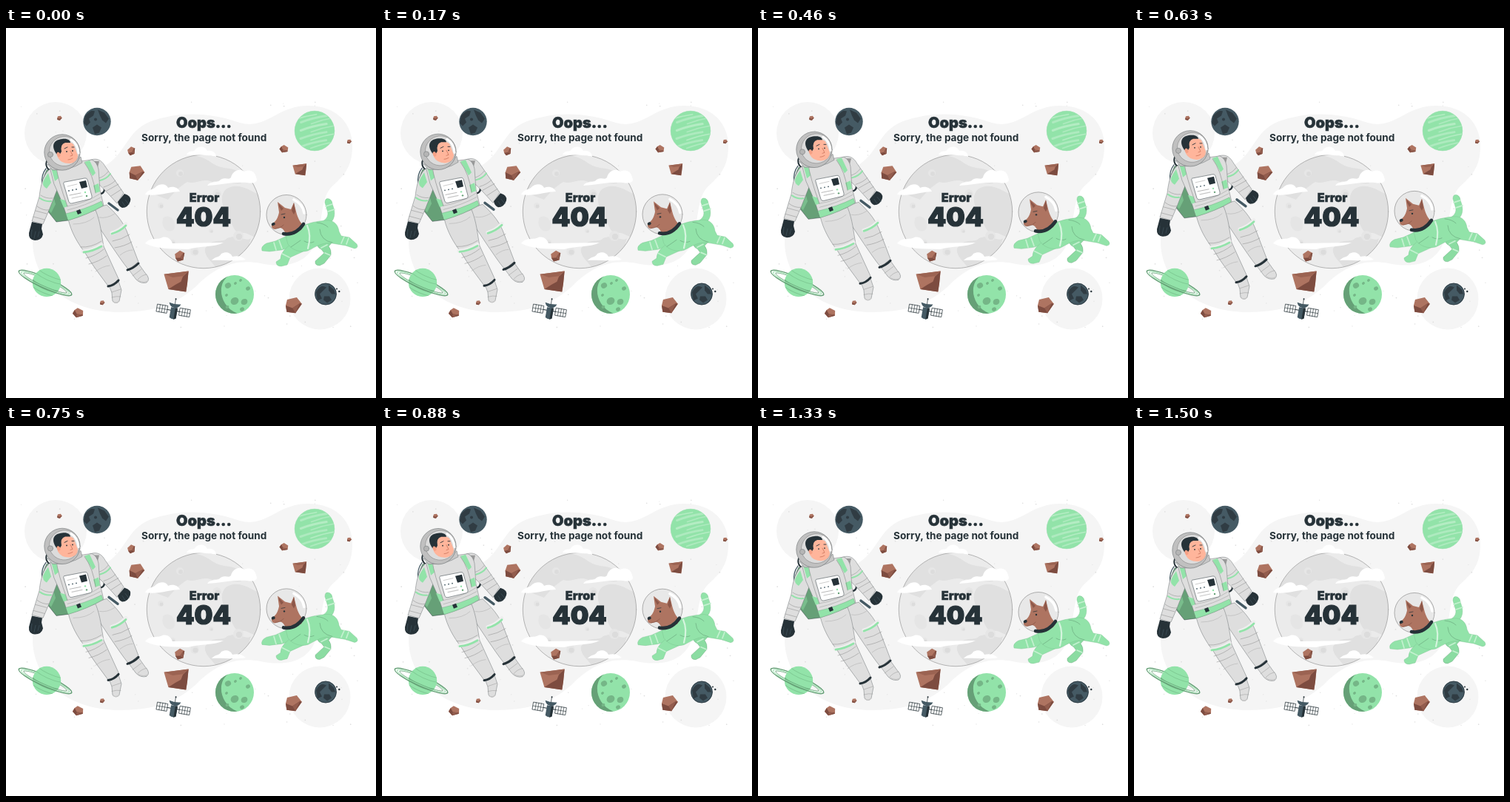
An HTML page with a canvas for the animation above (1.54 s loop, 500 by 500 pixels).

```html
<!DOCTYPE html>
<html lang="en">
<head>
<meta charset="utf-8">
<title>Page not found</title>
<style>
html, body { margin: 0; width: 100%; height: 100%; overflow: hidden; background: #fff; }
canvas { display: block; width: 100vw; height: 100vh; }
</style>
</head>
<body>
<canvas id="stage"></canvas>
<script>
const LOOP = 1540, SIZE = 500;
const INK = '#263238', SLATE = '#455a64', PALE = '#f5f5f5', GREY = '#e0e0e0', MID = '#c7c7c7';
const SUIT = '#dedede', SEAM = '#6d7275';
const GREEN = '#92e3a9', LEAF = '#66a077', MINT = '#aeeabf', ROCK = '#ae7461', ROCK_DARK = '#7d4c40';

const canvas = document.getElementById('stage');
const ctx = canvas.getContext('2d');
const ratio = window.devicePixelRatio || 1;
canvas.width = canvas.height = SIZE * ratio;

function paint(path, fill, stroke, width = 0.6) {
  if (fill) { ctx.fillStyle = fill; ctx.fill(path); }
  if (stroke) { ctx.strokeStyle = stroke; ctx.lineWidth = width; ctx.stroke(path); }
}
const shape = (d, fill, stroke, width) => paint(new Path2D(d), fill, stroke, width);
const line = (d, color = INK, width = 0.6) => shape(d, null, color, width);
const cloth = d => shape(d, SUIT, SEAM, 0.5);

function oval(x, y, rx, ry, angle, fill, stroke, width) {
  const path = new Path2D();
  path.ellipse(x, y, rx, ry, angle, 0, 7);
  paint(path, fill, stroke, width);
}
const disc = (x, y, r, fill, stroke, width) => oval(x, y, r, r, 0, fill, stroke, width);

function placed(x, y, angle, scale, draw) {
  ctx.save();
  ctx.translate(x, y);
  ctx.rotate(angle);
  ctx.scale(scale, scale);
  draw();
  ctx.restore();
}

function globe(x, y, r, fill, draw) {
  ctx.save();
  ctx.translate(x, y);
  disc(0, 0, r, fill);
  const edge = new Path2D();
  edge.arc(0, 0, r, 0, 7);
  ctx.clip(edge);
  draw();
  ctx.restore();
}

function text(str, x, y, size, weight, bolder = 0) {
  ctx.font = `${weight} ${size}px Inter, sans-serif`;
  ctx.textAlign = 'center';
  ctx.fillStyle = ctx.strokeStyle = INK;
  ctx.lineWidth = bolder;
  ctx.lineJoin = 'miter';
  ctx.fillText(str, x, y);
  if (bolder) ctx.strokeText(str, x, y);
  ctx.lineJoin = 'round';
}

function lump(x, y, r, angle = 0) {
  placed(x, y, angle, r, () => {
    shape('M-.75-.8L.45-.95L1-.1L.1.95L-.95.7L-1-.1Z', ROCK);
    shape('M-1-.1L-.2.3L.75-.2L1-.1L.1.95L-.95.7Z', ROCK_DARK);
    shape('M-.2.3L.75-.2L.35.5L.1.95Z', '#935d4e');
  });
}

function shard(x, y, r) {
  placed(x, y, 0, r, () => {
    shape('M-1-.55L.95-.8L.85.2L.75.85L-.65.65Z', ROCK);
    shape('M.95-.8L.85.2L.75.85L-.65.65L-.1.3L.35.05L.5-.35Z', ROCK_DARK);
    shape('M-1-.55L.95-.8L.5-.4L-.3-.3Z', '#9b6352');
  });
}

function stars() {
  let seed = 11;
  const random = () => (seed = seed * 16807 % 2147483647) / 2147483647;
  for (let i = 0; i < 110; i++) {
    disc(20 + random() * 455, 100 + random() * 305, 0.5 + random() * 0.45, GREY);
  }
}

function backdrop() {
  disc(67, 142, 42, PALE);
  disc(424, 366, 41.5, PALE);
  shape('M36 292C34 240 62 202 118 192C162 182 158 140 196 126C236 112 276 114 316 128C352 138 366 105 408 105C448 105 468 130 468 160C468 194 450 204 438 217C426 232 428 258 420 284C412 316 382 326 344 318C306 311 280 326 258 348C234 370 206 384 154 384C86 384 39 346 36 292Z', PALE);
  stars();
}

function moon() {
  globe(267, 248, 76.5, '#ebebeb', () => {
    shape('M-74-26C-62-50-48-68-20-76C2-76 8-66 18-62C30-56 42-62 58-46L50-38C34-36 26-44 12-40C-2-46-10-36-22-40C-32-34-40-26-48-16Z', GREY);
    shape('M30-30C46-40 60-30 80-20L82 34C66 40 60 24 48 30C36 22 38 8 30 0C24-10 22-22 30-30Z', GREY);
    shape('M2 50C12 34 24 44 32 36C46 30 58 42 64 36L54 70 18 82C18 70 0 64 2 50Z', GREY);
    shape('M-54 8C-44 2-36 14-40 24C-48 32-60 20-54 8Z', '#e5e5e5');
    for (const [x, y, r] of [[-32, -52, 5], [18, -24, 6], [47, 33, 7], [-42, 42, 4], [-12, 54, 6], [-58, -8, 4], [10, 26, 3]]) {
      disc(x, y, r, '#e6e6e6');
      disc(x + 1, y + 1, r * 0.6, '#dcdcdc');
    }
  });
  disc(267, 248, 76.7, null, '#8f8f8f', 0.65);
  shape('M244 171C247 164 254 169 256 164C261 158 270 160 272 166C278 165 284 168 284 174C272 171 258 172 244 171Z', '#fff');
  shape('M272 213C276 206 286 210 290 205C298 201 301 206 304 202C306 193 316 189 322 194C330 190 337 194 338 202C342 208 334 211 326 209C306 208 290 212 272 213Z', '#fff');
  shape('M188 225C192 217 199 219 202 215C209 209 217 211 219 216C226 213 233 216 235 221C222 221 206 228 188 225Z', '#fff');
  shape('M188 291C195 282 205 287 211 283C219 281 223 286 225 291L294 290C279 297 264 294 246 299C222 298 203 299 188 291Z', '#fff');
  shape('M278 314C283 308 288 311 291 305C298 301 304 304 306 309C314 307 319 309 324 313C312 316 292 313 278 314Z', '#fff');
}

function planets() {
  globe(123, 126.5, 18.7, SLATE, () => {
    shape('M-16-8C-10-14-8-16-3-14L-5-8-11-4-9 1-14 6-18 2Z', '#303c43');
    shape('M1-16L10-12 16-4 12 2 7-2 4-8Z', '#303c43');
    shape('M-6 8L0 4 6 8 3 15-3 17Z', '#303c43');
    disc(-2, -3, 2, '#303c43');
  });
  globe(417, 139, 27, GREEN, () => {
    ctx.rotate(-0.25);
    for (let i = 0; i < 9; i++) {
      const y = -21 + i * 5.3, x = (i * 13) % 29 - 28;
      line(`M${x} ${y}Q${x + 18} ${y - 2} ${x + 36} ${y}`, i % 3 ? MINT : '#b4ecc3', 1.6 + i % 2 * 1.4);
    }
  });
  disc(417, 139, 26.8, null, '#9fe0b2', 0.6);

  globe(309, 360, 26, GREEN, () => {
    shape('M-4-27C-24-20-24 14 4 26L-28 28-28-26Z', LEAF);
    for (const [x, y, r] of [[-9, -12, 4.2], [8, -19, 2], [0, 9, 5.6], [13, 10, 4.5], [18, -8, 3], [-11, 1, 2], [1, -15, 2], [10, 20, 3], [-10, 17, 2.4]]) {
      oval(x, y, r, r * 0.86, -0.5, '#75b687');
    }
  });

  globe(432, 359.5, 14.7, SLATE, () => {
    shape('M-13-2C-9-11-4-12 1-9L-4-4-8 0-5 6-11 9Z', '#303c43');
    shape('M4-12L11-6 13 0 8 0 4-5Z', '#303c43');
    shape('M-2 3L5 3 8 8 2 12-3 8Z', '#303c43');
  });
  disc(432, 359.5, 14.4, null, INK, 0.7);
  disc(447, 352.5, 1, INK);
  disc(450.3, 356, 1.2, INK);
}

function ringed() {
  const ring = (from, to) => placed(53, 344.5, 0.42, 1, () => {
    for (const [rx, ry, color, width] of [[39, 7.2, LEAF, 1.4], [35.5, 5.6, GREEN, 0.9], [32, 4.6, LEAF, 0.7]]) {
      const path = new Path2D();
      path.ellipse(0, 0, rx, ry, 0, from, to);
      paint(path, null, color, width);
    }
  });
  ring(Math.PI, 2 * Math.PI);
  globe(55, 344, 19.2, GREEN, () => {
    ctx.rotate(0.42);
    for (const y of [-12, -6, 12]) line(`M-20 ${y}Q0 ${y + 5} 20 ${y}`, '#7fca94', 0.9);
    shape('M-20 3Q0 11 20 3L20 6Q0 14-20 6Z', '#79c18d');
  });
  ring(0, Math.PI);
}

function satellite() {
  placed(227, 381, 0.17, 1, () => {
    line('M-16 1L16 1', INK, 1);
    for (const x of [-23, 8]) {
      shape(`M${x}-4h14v10h-14z`, '#fff', INK, 0.7);
      line(`M${x} 1h14M${x + 3.5}-4v10M${x + 7}-4v10M${x + 10.5}-4v10`, INK, 0.6);
    }
    shape('M-4.5-3H4.5V11Q0 14-4.5 11Z', SLATE);
    shape('M1.5-3H4.5V11L1.5 13Z', INK);
    shape('M-8-9Q0-7 8-9Q6-3 0-3Q-6-3-8-9Z', SLATE);
    line('M0-8V-15', INK, 0.7);
    disc(0, -15, 1, INK);
  });
}

function rocks() {
  lump(72.5, 121.8, 3.2);
  lump(170, 166, 5.5, -0.6);
  lump(177, 196, 10.3);
  lump(376, 164, 5.5, 0.7);
  shard(397, 191, 9.6);
  lump(464, 153.5, 3);
  lump(235.5, 308, 7, -0.5);
  shard(230.5, 342, 17);
  lump(98, 385.5, 6.8, 0.6);
  lump(130.3, 371.3, 3.2);
  lump(389, 375, 11, -0.1);
}

function dog() {
  const fur = d => shape(d, GREEN, '#79c18d', 0.4);
  const bands = d => line(d, '#c4f1d0', 1.7);
  shape('M426 283C419 290 419 296 426 299L430 304 418 315Q417 321 424 321L430 318 439 307Q440 300 436 295L446 284Z', '#8bdca2', LEAF, 0.4);
  fur('M386 278L364 288 352 291Q344 295 346 301L356 302 372 300 394 294Z');
  fur('M422 264C433 260 437 254 434 246L431 236Q431 229 437 231Q441 233 441 238C446 250 445 260 434 267Z');
  fur('M390 287L376 300Q371 306 371 312L365 316Q365 322 372 322L380 320 384 310 406 300Z');

  fur('M378 279C388 277 397 268 404 266C414 262 424 261 432 260C443 259 449 266 450 275L453 281 464 283 474 292Q477 297 471 298L459 294 441 291C428 289 420 295 408 301C398 304 386 300 381 292Z');
  line('M424 272Q425 287 441 290M398 287Q391 292 385 296M420 263Q430 264 435 269M403 288Q410 292 416 289', LEAF, 0.6);
  line('M407 267Q413 280 408 298', '#d5f5de', 2.2);
  bands('M432 241L441 238M435 248L444 245M362 290L365 300M369 287L373 298M373 305L383 310M426 297L434 293M431 304L438 307M457 282L453 291M463 284L460 292');

  disc(379, 252.5, 27, '#e8e8e8', '#8f8f8f', 0.7);
  shape('M369 249L367 235 377 243 385 245 389 236 392 248C394 256 397 262 402 267L399 273 378 278C376 274 374 270 370 270L363 272Q358 271 359 265C365 262 368 255 369 249Z', '#ae7461');
  shape('M386 247L389 236 391 248 389 252Z', '#8c5749');
  shape('M369 241L368 237 375 244 372 247Z', '#8c5749');
  line('M364 271Q371 271 375 266', '#7d4c40', 0.6);
  oval(361.2, 265, 2.6, 2, -0.4, INK);
  disc(376, 256, 1.2, INK);
  line('M372 252L377 251', INK, 0.7);
  line('M375 278Q391 281 402 265', INK, 4.6);
  line('M389 232Q401 238 403 250', '#fff', 3.6);
}

function backpack() {
  shape('M55 192C48 205 46 220 49 238L68 262 84 260 76 190Z', LEAF, INK, 0.45);
  shape('M50 218L59 208 67 238 61 250 50 238Z', '#79bd8c');
  line('M60 177C52 178 53 188 59 192', INK, 2);
  line('M54 190Q47 199 49 211', SLATE, 1.3);
  line('M125 211C135 209 136 225 126 224', INK, 2.4);
  line('M139 237L151 246', SLATE, 3.4);
}

function legs() {
  cloth('M116 245L136 239C147 249 157 260 163 274L179 316 166 327C157 316 150 305 143 295L125 268Z');
  cloth('M84 258L121 246C128 263 129 280 132 295L153 341 139 350C129 336 116 320 107 304C97 291 88 276 84 258Z');
  line('M104 302Q117 301 129 293', '#eee', 5);
  line('M105 303Q117 302 129 295', GREEN, 2.8);
  line('M143 277Q154 274 162 265', '#eee', 5);
  line('M143 278Q154 275 162 267', GREEN, 2.8);
  line('M101 296Q115 297 129 288M108 311Q121 308 132 299M112 319Q125 316 136 308M144 288Q156 286 167 279M147 297Q160 295 170 289', '#888', 0.5);
  line('M91 265Q109 265 119 256M126 256Q136 258 147 251M121 329Q130 322 140 321M154 307Q163 300 171 300', '#aaa', 0.5);
  cloth('M140 349L152 342 156 354 153 369Q149 374 144 369L143 358Z');
  cloth('M166 326L178 317 188 331Q196 339 190 344Q182 346 176 340Z');
  line('M138 349Q146 348 152 341', INK, 3);
  line('M164 327Q172 325 179 318', INK, 3);
  line('M143 357L155 353M143 364Q150 362 155 363M171 335L183 326M178 340Q183 334 190 333', '#999', 0.5);
  line('M145 370Q149 373 153 369M178 341Q186 345 191 342', MID, 1.3);
}

function arms() {
  cloth('M63 189C53 192 47 208 45 228L35 261 50 265 59 244 70 216Z');
  shape('M53 202L57 196 61 209 55 217Q49 214 50 208Z', GREEN);
  line('M46 230Q53 235 61 234', GREEN, 2);
  line('M47 226Q54 231 63 230M42 241Q50 247 58 246M40 247L55 251M37 255L52 259', '#888', 0.5);
  shape('M35 262L49 265 48 271 50 279Q48 287 39 287Q30 286 31 277Z', INK);
  line('M35 273L34 282M40 275L38 284M45 275L43 282', SLATE, 0.6);

  cloth('M110 180C122 174 129 178 134 187L159 223 150 237C139 225 129 213 119 206Z');
  shape('M115 191L118 180 126 180 123 192Z', '#9a9a9a');
  line('M127 206Q136 204 141 197', GREEN, 2);
  line('M125 203Q133 201 138 194M132 215Q142 212 148 206M136 220L152 211M142 227L156 218', '#888', 0.5);
  shape('M151 235L160 224Q170 227 168 234Q165 243 157 243Q152 241 151 235Z', INK);
  line('M157 235L161 241M161 232L166 238', SLATE, 0.6);
}

function torso() {
  cloth('M60 190C70 184 100 180 116 178Q123 181 125 191L127 219 132 240Q111 252 84 260L76 236 65 211Z');
  shape('M61 189L67 187 71 203 66 207Z', GREEN);
  shape('M73 231L80 233 83 241 78 243Z', GREEN);
  shape('M106 181L113 179 121 196 117 200Z', GREEN);
  shape('M118 213L125 210 127 221 121 223Z', GREEN);
  line('M68 188Q70 205 83 241M106 182Q118 198 121 223', '#777', 0.5);
  shape('M81 251Q107 245 129 234L131 240Q111 252 84 260Z', GREEN, LEAF, 0.4);
  shape('M95 247L100 245 102 250 97 252Z', INK);
  line('M82 241Q107 237 127 224M83 246Q108 240 128 229', '#999', 0.5);
  shape('M78 211Q77 208 80 208L106 203Q109 202 110 205L116 227Q117 230 114 231L89 237Q86 238 85 235Z', '#fff', INK, 0.5);
  shape('M99 208L108 206 110 215 102 217Z', INK);
  line('M83 214L96 211', '#aaa', 0.6);
  line('M86 226L101 223', '#999', 0.7);
  line('M89 230L103 227', MID, 1.2);
  for (const [x, y] of [[85, 220], [90, 219], [95, 218]]) disc(x, y, 0.9, SLATE);
  disc(107, 222, 1.2, GREEN);
  disc(109, 227, 1.2, LEAF);
}

function helmet() {
  shape('M56 184Q80 195 101 174L103 182Q86 193 63 192Z', MID, SEAM, 0.5);
  disc(76, 168, 24.2, '#c0c0c0', SEAM, 0.6);
  oval(79, 166.5, 20.5, 20, -0.3, '#dcdcdc', '#777', 0.5);
  shape('M68 157Q78 149 91 157L97 172Q97 181 87 183Q75 184 70 175Z', '#ffb59b');
  shape('M68 170C60 158 65 151 76 150C83 149 87 152 87 155L80 155Q73 157 75 167L72 172Z', INK);
  oval(71, 171, 2.3, 3.3, -0.3, '#f6a185');
  line('M79 163L83 161M89 161L92 161', INK, 0.9);
  disc(82, 167, 0.9, INK);
  disc(90, 166, 0.9, INK);
  line('M87 166L90 172 87 173M84 178Q87 178 90 176', '#b95f47', 0.6);
  line('M88 151Q97 157 98 169', '#fff', 3);
  disc(60, 171, 3.6, '#b5b5b5', SEAM, 0.5);
}

function astronaut() {
  backpack();
  arms();
  legs();
  torso();
  helmet();
}

function frame(now) {
  const phase = (now % LOOP) / LOOP * 2 * Math.PI;
  const lift = -2.8 * (1 - Math.cos(phase));
  ctx.setTransform(ratio, 0, 0, ratio, 0, 0);
  ctx.fillStyle = '#fff';
  ctx.fillRect(0, 0, SIZE, SIZE);
  ctx.lineCap = ctx.lineJoin = 'round';

  backdrop();
  moon();
  planets();
  ringed();
  satellite();
  rocks();
  placed(0, lift, 0, 1, astronaut);
  placed(0, lift, 0, 1, dog);

  text('Oops...', 267.5, 135.2, 20, 900, 0.5);
  text('Sorry, the page not found', 267.7, 153, 13.6, 700);
  text('Error', 268, 234.5, 16.2, 900, 0.4);
  placed(267, 255, 0, 1 + 0.022 * Math.sin(phase), () => text('404', 0, 13, 35, 900, 1.2));
}

let start;
function tick(now) {
  start ??= now;
  frame(now - start);
  requestAnimationFrame(tick);
}
frame(0);
requestAnimationFrame(tick);
</script>
</body>
</html>
```
